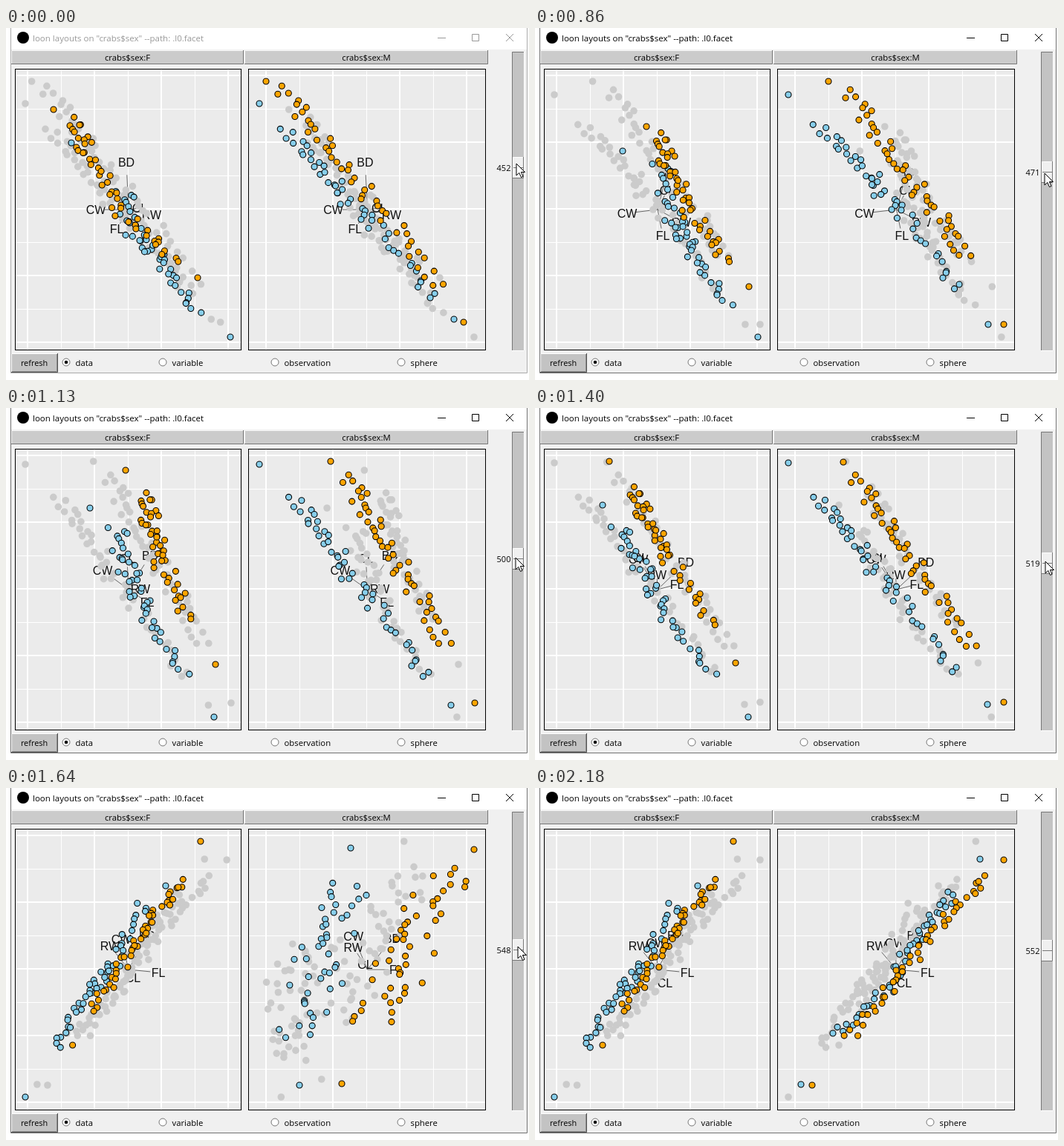
Write an HTML page that moves like this. It is 704 by 475 pixels and loops after 2710 ms.

```html
<!DOCTYPE html>
<html lang="en">
<head>
<meta charset="utf-8">
<title>Crab scatterplots</title>
<style>
html, body { margin: 0; width: 100%; height: 100%; overflow: hidden; background: #fff; }
svg { display: block; width: 704px; height: 475px; }
text { font: 11.3px "Open Sans", "Noto Sans", sans-serif; fill: #000; }
.axis text { font: 16px "Liberation Sans", Arial, sans-serif; fill: #111; text-anchor: middle; }
.axis line { stroke: #666; stroke-width: 1; }
.mid { text-anchor: middle; }
.crisp { shape-rendering: crispEdges; }
</style>
</head>
<body>
<svg id="stage" viewBox="0 0 704 475"></svg>
<script>
const stage = document.getElementById('stage');
const LOOP = 2710, COUNT = 48;

const set = (node, attrs) => { for (const k in attrs) node.setAttribute(k, attrs[k]); };
function el(parent, tag, attrs, text) {
  const node = document.createElementNS('http://www.w3.org/2000/svg', tag);
  set(node, attrs);
  if (text) node.textContent = text;
  parent.appendChild(node);
  return node;
}
const rect = (x, y, width, height, fill, more) =>
  el(stage, 'rect', { x, y, width, height, fill, class: 'crisp', ...more });
const path = (d, stroke, more) => el(stage, 'path', { d, stroke, fill: 'none', ...more });
const lerp = (a, b, f) => a + (b - a) * f;

// The male panel is slightly wider than the female one
const toMale = x => 341 + (x - 26) * 1.047;
const toFemale = x => 26 + (x - 341) / 1.047;

let seed = 2024;
const rand = () => (seed = seed * 16807 % 2147483647) / 2147483647;
const bell = () => rand() + rand() - 1;
const groups = [0, 1, 2, 3];
const noise = groups.map(() => Array.from({ length: COUNT }, () => [bell(), bell()]));

// First and last pairs are lone extremes; the rest is a spine the points scatter around
function scatter(flat, group, width) {
  const knots = [];
  for (let i = 0; i < flat.length; i += 2)
    knots.push([group > 1 ? toFemale(flat[i]) : flat[i], flat[i + 1]]);
  const last = knots.length - 1;
  return noise[group].map(([jx, jy], i) => {
    if (i === 0) return knots[0];
    if (i === COUNT - 1) return knots[last];
    const u = 1 + (i - 1) / (COUNT - 2) * (last - 2);
    const k = Math.floor(u), a = knots[k], b = knots[k + 1];
    return [lerp(a[0], b[0], u - k) + jx * width, lerp(a[1], b[1], u - k) + jy * 6];
  });
}
// Spines: female blue, female orange, male blue, male orange
const pose = (width, ...spines) => spines.map((s, g) => scatter(s, g, width));

const start = pose(16,
  [88,155, 156,225, 176,280, 214,315, 256,388, 302,417],
  [64,110, 88,124, 116,176, 160,250, 230,318, 258,337],
  [341,102, 380,136, 434,206, 490,262, 582,374, 603,393],
  [350,72, 372,80, 440,166, 508,250, 588,355, 616,397]);
const early = pose(16,
  [118,166, 166,188, 190,262, 212,298, 260,378, 300,417],
  [150,133, 166,145, 185,193, 214,252, 258,318, 288,349],
  [341,90, 385,130, 446,197, 490,248, 575,362, 610,400],
  [395,72, 425,85, 480,170, 534,242, 582,312, 631,400]);
const middle = pose(17,
  [113,135, 146,166, 167,222, 190,275, 240,364, 280,417],
  [161,84, 185,118, 200,165, 214,212, 244,288, 282,346],
  [341,76, 392,120, 438,192, 490,262, 572,372, 599,401],
  [437,72, 462,92, 503,166, 546,240, 594,324, 631,398]);
const late = pose(15,
  [91,131, 110,165, 147,216, 174,274, 240,364, 287,417],
  [100,72, 130,110, 155,155, 184,205, 240,297, 270,344],
  [341,74, 385,120, 430,184, 484,252, 572,366, 609,400],
  [415,73, 432,92, 485,168, 530,240, 592,328, 631,397]);
const turning = pose(42,
  [130,205, 90,215, 68,262, 75,320, 60,370, 54,417],
  [212,72, 215,110, 200,180, 165,240, 118,320, 106,393],
  [464,81, 468,128, 428,195, 410,260, 388,345, 395,401],
  [630,83, 606,110, 560,185, 525,252, 485,320, 452,399]);
const end = pose(12,
  [219,132, 186,160, 146,240, 112,280, 64,354, 26,417],
  [267,72, 240,127, 200,180, 163,234, 112,304, 91,347],
  [599,96, 564,140, 512,203, 472,272, 400,338, 358,400],
  [631,97, 606,120, 542,192, 482,262, 418,340, 373,401]);

const nearEnd = end.map(group => group.map(([x, y]) => [lerp(26, x, .979), y]));
const views = [start, early, middle, late];
const poses = [[...views, nearEnd, end], [...views, turning, end]];

// Variable labels, one row per pose
const names = ['BD', 'CW', 'CL', 'RW', 'FL'];
const tags = [
  [162,181, 121,245, 180,243, 196,252, 149,271],
  [178,195, 124,250, 178,219, 197,262, 172,280],
  [194,199, 130,219, 163,203, 181,244, 190,262],
  [203,208, 139,204, 142,202, 164,225, 191,238],
  [190,199, 155,204, 171,256, 140,213, 205,249],
  [189,199, 163,209, 175,263, 139,213, 205,249]
];
const turningTags = [197,203, 147,200, 162,238, 147,215, 202,245];
const tagPoses = [tags, tags.with(4, turningTags)];

const sliderValues = [452, 471, 500, 519, 548, 552];
const cursorX = [686, 686, 686, 687, 689, 689];
const cursorY = [183, 196, 202, 207, 214, 216];
const times = [0, 590, 710, 860, 980, 1130, 1250, 1400, 1520, 1640, 1790, 1910, 2060, 2180];

const along = (list, at) => lerp(list[Math.floor(at)], list[Math.ceil(at)], at % 1);

// Blended views are scaled again to fill the panel
function fit(view) {
  const all = view.flat();
  const scale = (axis, lo, hi) => {
    const v = all.map(p => p[axis]), min = Math.min(...v), max = Math.max(...v);
    return n => lerp(lo, hi, (n - min) / (max - min));
  };
  const sx = scale(0, 26, 302), sy = scale(1, 72, 417);
  return view.map(g => g.map(([x, y]) => [sx(x), sy(y)]));
}
function viewAt(list, at) {
  const k = Math.floor(at), f = at - k;
  if (!f) return list[k];
  return fit(list[k].map((g, gi) => g.map(([x, y], i) => {
    const b = list[k + 1][gi][i];
    return [lerp(x, b[0], f), lerp(y, b[1], f)];
  })));
}

function relief(x, y, w, h, fill, light, dark) {
  rect(x, y, w, h, fill);
  path(`M${x + .5} ${y + h}V${y + .5}H${x + w}`, light);
  path(`M${x} ${y + h - .5}H${x + w - .5}V${y}`, dark);
}

// Window
rect(6, 0, 696, 466, '#f0f0f0');
rect(7, 0, 694, 29, '#fff');
const frame = path('M6.5 0V465.5H701.5V0');
el(stage, 'circle', { cx: 23, cy: 13, r: 8, fill: '#000' });
const title = el(stage, 'text', { x: 36, y: 18, style: 'font-size:11.5px' },
  'loon layouts on "crabs$sex" --path: .l0.facet');
const buttons = path('M581 13.5H592M627.5 8.5H636.5V17.5H627.5ZM673 8L683 18M683 8L673 18');

function panel(male, x, w, head, headW, label, gridX) {
  relief(head, 30, headW, 19, '#cbcbcb', '#f8f8f8', '#777');
  el(stage, 'text', { x: head + headW / 2, y: 44, class: 'mid' }, label);
  rect(x, 55, w, 380, '#ebebeb');
  // Thick and thin grid lines alternate
  for (let i = 0; i < 9; i++) {
    const thick = 1 - i % 2;
    if (i < 7) rect(gridX + i * 45 - thick, 56, 1 + thick, 378, '#fff');
    rect(x, 64 + i * 45 - thick, w, 1 + thick, '#fff');
  }
  rect(x + .5, 55.5, w - 1, 379, 'none', { stroke: '#000' });

  const px = male ? toMale : v => v, side = male ? 1 : 0;
  const axis = el(stage, 'g', { class: 'axis' });
  const lines = names.map(() => el(axis, 'line', { x1: px(165), y1: 245 }));
  const texts = names.map(n => el(axis, 'text', {}, n));
  const dots = [];
  const isOwn = g => (g > 1) === male;
  const addDots = (g, attrs) => {
    dots[g] = noise[g].map(() => el(stage, 'circle', attrs));
  };
  groups.filter(g => !isOwn(g)).forEach(g => addDots(g, { r: 4.8, fill: '#cbcbcb' }));
  groups.filter(isOwn).forEach(g => addDots(g,
    { r: 4, fill: g % 2 ? '#ffa500' : '#87ceeb', stroke: '#000', 'stroke-width': 1.1 }));

  return at => {
    viewAt(poses[side], at).forEach((g, gi) =>
      g.forEach(([cx, cy], i) => set(dots[gi][i], { cx: px(cx), cy })));
    const rows = tagPoses[side];
    names.forEach((_, i) => {
      const x = px(along(rows.map(r => r[2 * i]), at)), y = along(rows.map(r => r[2 * i + 1]), at);
      set(texts[i], { x, y: y + 6 });
      set(lines[i], { x2: lerp(px(165), x, .73), y2: lerp(245, y, .73) });
    });
  };
}
const showFemale = panel(false, 12, 305, 7, 313, 'crabs$sex:F', 29);
const showMale = panel(true, 326, 320, 321, 328, 'crabs$sex:M', 350);

// Controls
relief(7, 439, 63, 26, '#c3c3c3', '#fff', '#555');
path('M8 463.5H68.5V440', '#8a8a8a');
el(stage, 'text', { x: 38, y: 456, class: 'mid', style: 'font-size:10.9px' }, 'refresh');
[[81, 'data'], [211, 'variable'], [362, 'observation'], [532, 'sphere']].forEach(([cx, label], i) => {
  el(stage, 'circle', { cx, cy: 451, r: 5, fill: '#fff', stroke: '#777' });
  if (!i) el(stage, 'circle', { cx, cy: 451, r: 2.3, fill: '#000' });
  el(stage, 'text', { x: cx + 12.5, y: 456 }, label);
});

relief(681, 32, 17, 404, '#c3c3c3', '#777', '#fff');
const thumb = el(stage, 'g', {});
el(thumb, 'rect', { x: 682, y: 0, width: 15, height: 29, fill: '#f0f0f0' });
el(thumb, 'path', { d: 'M682.5 29V.5H697', stroke: '#fff', fill: 'none' });
el(thumb, 'path', { d: 'M682 28.5H696.5V0M683 14.5H696', stroke: '#777', fill: 'none' });
const value = el(stage, 'text', { x: 670, class: 'mid', style: 'font-size:11px' });
const cursor = path('M0 0V16L3.8 12.4L6.5 18.5L9 17.4L6.4 11.5H11.5Z', '#000', { fill: '#fff' });

let shown = -1;
function draw(now) {
  const step = times.findLastIndex(t => now % LOOP >= t);
  if (step === shown) return;
  shown = step;
  const at = Math.min(5, Math.max(0, (step - 1) / 2));
  // The male panel lags behind at the end
  const maleAt = step < 11 ? at : 5 - (13 - step) * .1;
  const number = Math.round(along(sliderValues, at));
  const top = Math.round(174 + (number - 452) * .31);
  const ink = step ? '#000' : '#999';
  title.style.fill = ink;
  set(buttons, { stroke: ink });
  set(frame, { stroke: step ? '#707070' : '#aaa' });
  showFemale(at);
  showMale(maleAt);
  set(thumb, { transform: `translate(0 ${top})` });
  set(value, { y: top + 19 });
  value.textContent = number;
  const x = along(cursorX, at) + (step ? 0 : 1);
  const y = step < 12 ? along(cursorY, at) : step < 13 ? 455 : 500;
  set(cursor, { transform: `translate(${x} ${y})` });
}
const begin = performance.now();
function tick() {
  draw(performance.now() - begin);
  requestAnimationFrame(tick);
}
tick();
</script>
</body>
</html>
```
